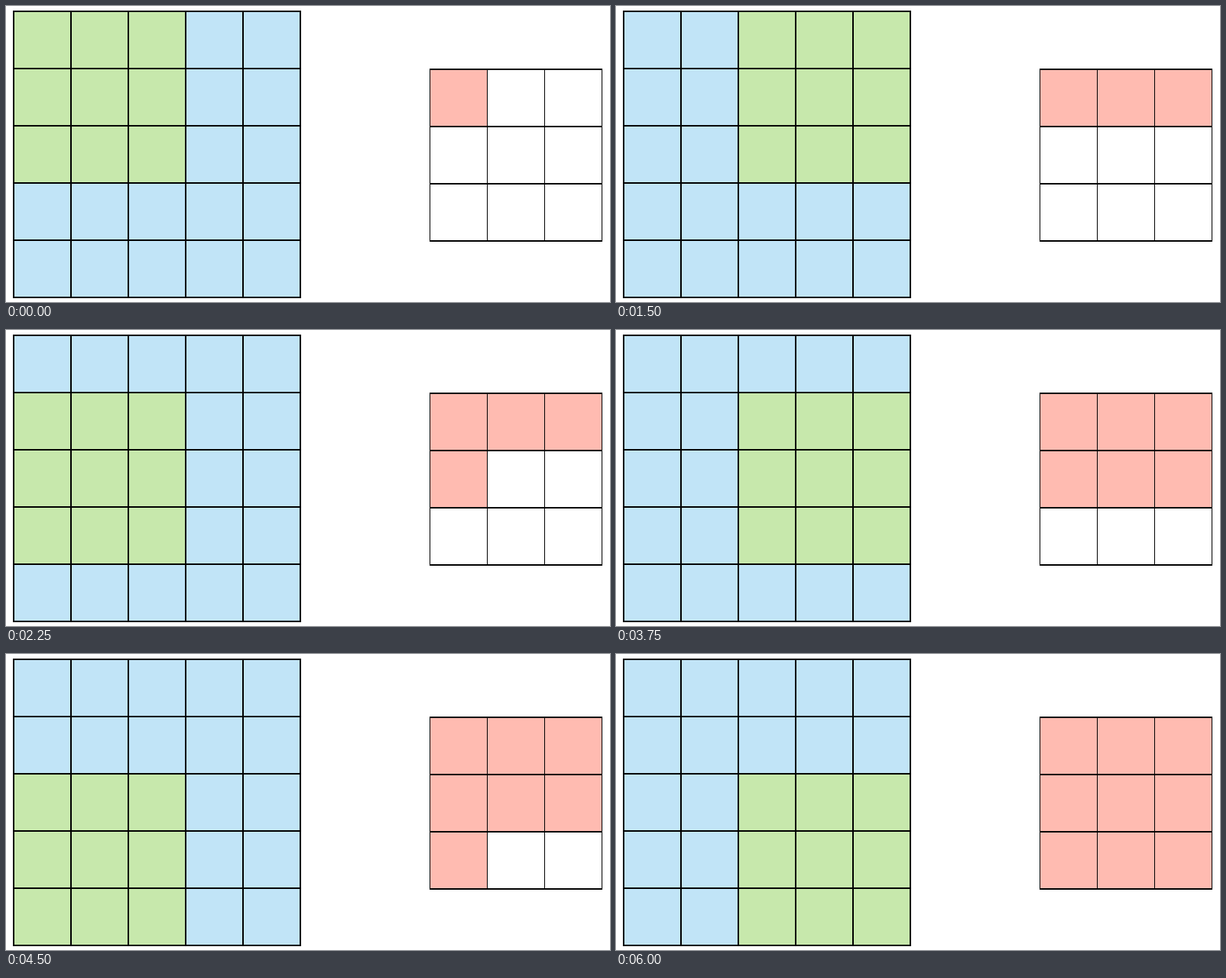
An HTML page for the animation above (6.75 s loop, 790x388 px).

```html
<!DOCTYPE html>
<html lang="en">
<head>
<meta charset="utf-8">
<title>Convolution window</title>
<style>
  html, body { margin: 0; width: 100%; height: 100%; overflow: hidden; background: #fff; }
  svg { display: block; width: 790px; height: 388px; }
</style>
</head>
<body>
<svg id="stage" viewBox="0 0 790 388" shape-rendering="crispEdges"></svg>
<script>
const CELL = 75, STEP = 750, KERNEL = 3, OUT = 3;
const BLUE = '#c1e4f7', GREEN = '#c7e8ac', PINK = '#ffbbb1';
const stage = document.getElementById('stage');

function add(name, attrs) {
  const el = document.createElementNS('http://www.w3.org/2000/svg', name);
  for (const key in attrs) el.setAttribute(key, attrs[key]);
  return stage.appendChild(el);
}

function box(x, y, cols, rows, fill) {
  return add('rect', { x, y, width: cols * CELL, height: rows * CELL, fill });
}

// Horizontal lines are 2px thick; the vertical thickness varies per grid.
function gridLines(x, y, n, thick) {
  const size = n * CELL, half = thick / 2;
  for (let i = 0; i <= n; i++) {
    const d = i * CELL;
    add('rect', { x: x + d - half, y: y - 1, width: thick, height: size + 2 });
    add('rect', { x: x - half, y: y + d - 1, width: size + thick, height: 2 });
  }
}

const inX = 10, inY = 7, outX = 554.5, outY = 83;

box(inX, inY, 5, 5, BLUE);
const kernel = box(inX, inY, KERNEL, KERNEL, GREEN);
const results = Array.from({ length: OUT * OUT }, (_, i) =>
  box(outX + i % OUT * CELL, outY + Math.floor(i / OUT) * CELL, 1, 1, PINK));
gridLines(inX, inY, 5, 2);
gridLines(outX, outY, OUT, 1);

function draw(time) {
  const step = Math.floor(time / STEP) % (OUT * OUT);
  kernel.setAttribute('x', inX + step % OUT * CELL);
  kernel.setAttribute('y', inY + Math.floor(step / OUT) * CELL);
  results.forEach((cell, i) => cell.setAttribute('visibility', i <= step ? 'visible' : 'hidden'));
}

const start = performance.now();
function tick() {
  draw(performance.now() - start);
  requestAnimationFrame(tick);
}
tick();
</script>
</body>
</html>
```
